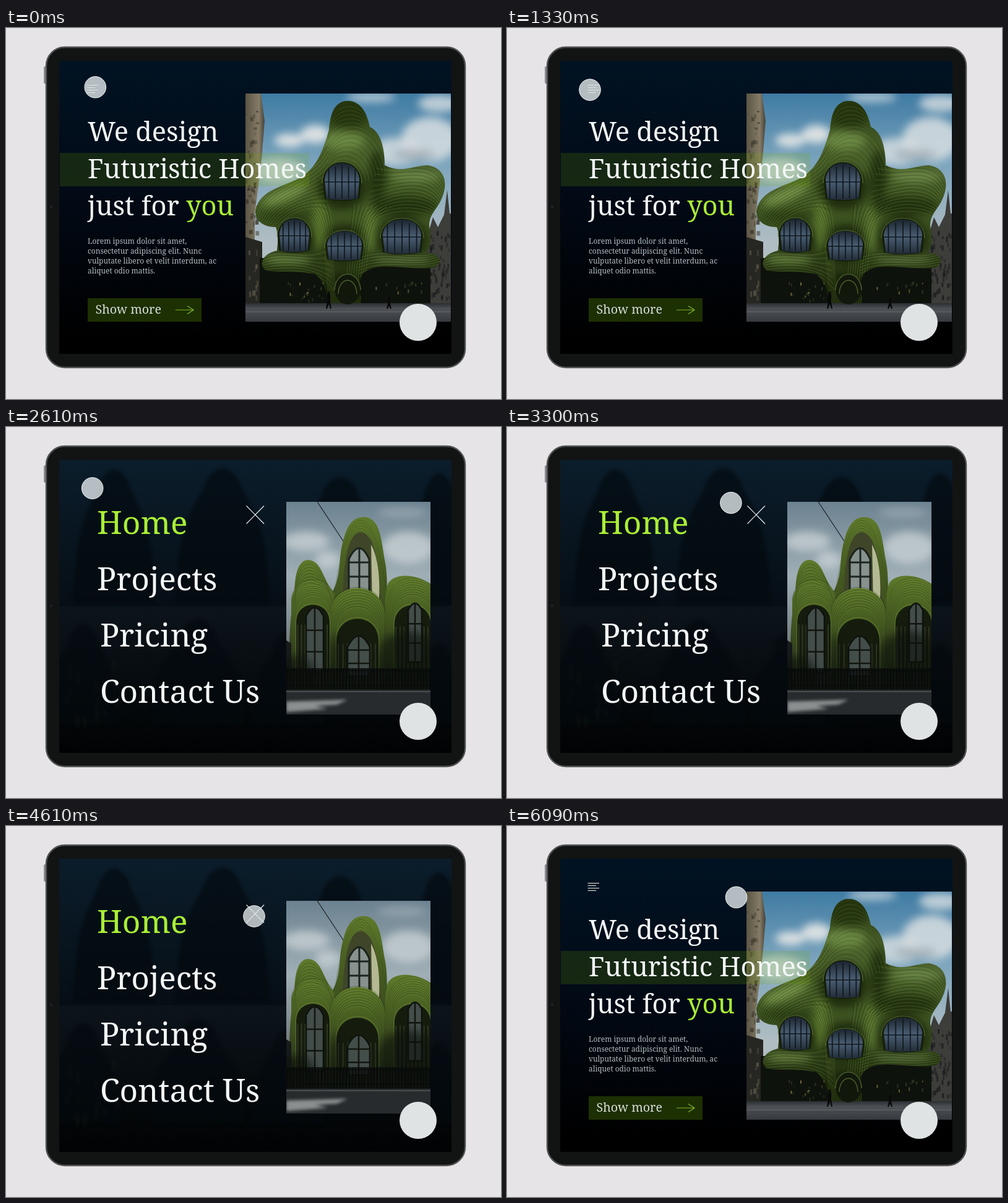
Write an HTML page that moves like this. It is 800x600 px and loops after 6120 ms.

```html
<!DOCTYPE html>
<html lang="en">
<head>
<meta charset="utf-8">
<title>Futuristic homes</title>
<style>
  html, body { margin: 0; width: 100%; height: 100%; overflow: hidden; background: #e6e4e7; }
  svg { display: block; width: 800px; height: 600px; }
  text { font-family: "Noto Serif", "Liberation Serif", serif; fill: #f3f7f7; white-space: pre; }
  .title { font-size: 43.3px; }
  .nav { font-size: 51.4px; }
  .copy { font-size: 11.9px; fill: #b4bcc2; }
  .lime, tspan.lime { fill: #a9ee35; }
  .soft { filter: url(#soft); }
  .haze { filter: url(#haze); }
  .line { fill: none; stroke: #e8edef; stroke-width: 1.2; }
</style>
</head>
<body>
<svg viewBox="0 0 800 600">
  <defs>
    <filter id="soft" x="-50%" y="-50%" width="200%" height="200%" color-interpolation-filters="sRGB"><feGaussianBlur stdDeviation="7"/></filter>
    <filter id="haze" x="-20%" y="-20%" width="140%" height="140%" color-interpolation-filters="sRGB"><feGaussianBlur stdDeviation="2.5"/></filter>
    <linearGradient id="night" x2="0" y2="1">
      <stop stop-color="#011323"/><stop offset=".45" stop-color="#020a16"/><stop offset=".95" stop-color="#000"/>
    </linearGradient>
    <linearGradient id="sky" x2="0" y2="1">
      <stop stop-color="#3f7ba3"/><stop offset=".3" stop-color="#7ba4bd"/><stop offset=".65" stop-color="#b0bdc2"/>
    </linearGradient>
    <linearGradient id="dull" x2="0" y2="1">
      <stop stop-color="#6c8290"/><stop offset=".35" stop-color="#a0afb6"/><stop offset=".8" stop-color="#5c6668"/>
    </linearGradient>
    <linearGradient id="moss" x2="0" y2="1">
      <stop stop-color="#2a3b13"/><stop offset=".25" stop-color="#4a602a"/><stop offset=".6" stop-color="#3d5220"/><stop offset="1" stop-color="#1a260c"/>
    </linearGradient>
    <linearGradient id="shell" x2="0" y2="1">
      <stop stop-color="#5f7a2b"/><stop offset=".3" stop-color="#465c20"/><stop offset=".65" stop-color="#33411d"/><stop offset="1" stop-color="#1b2412"/>
    </linearGradient>
    <linearGradient id="stone" x2="1" y2="0">
      <stop stop-color="#5b5545"/><stop offset=".7" stop-color="#857b66"/><stop offset="1" stop-color="#45423a"/>
    </linearGradient>
    <linearGradient id="glass" x2="0" y2="1">
      <stop stop-color="#1a242e"/><stop offset=".5" stop-color="#4a5e73"/><stop offset="1" stop-color="#222d38"/>
    </linearGradient>
    <linearGradient id="road" x2="0" y2="1">
      <stop stop-color="#2b2e31"/><stop offset=".3" stop-color="#4d5055"/><stop offset="1" stop-color="#36393e"/>
    </linearGradient>
    <linearGradient id="upper" x2="0" y2="1"><stop stop-color="#0b1d2b"/><stop offset="1" stop-color="#060e15"/></linearGradient>
    <linearGradient id="lower" x2="0" y2="1"><stop stop-color="#0c141b"/><stop offset=".75" stop-color="#040709"/><stop offset="1" stop-color="#010203"/></linearGradient>
    <clipPath id="screen"><rect x="86" y="53" width="634" height="474"/></clipPath>
    <clipPath id="wide"><rect x="387" y="106" width="332" height="369"/></clipPath>
    <clipPath id="tall"><rect x="453" y="121" width="233" height="344"/></clipPath>
    <path id="body" d="M522 165C524 140 530 120 550 118C574 116 584 140 588 160C606 168 612 195 612 222C640 236 660 222 682 222C706 226 714 246 707 268C700 292 684 298 684 320C688 340 686 352 680 364C706 364 706 384 690 388C650 392 600 376 578 396C566 410 574 425 574 445H520C520 425 512 408 500 398C470 392 440 396 420 392C408 384 412 366 438 360C440 344 440 332 436 322C412 322 396 306 406 286C416 264 440 258 468 246C500 232 512 200 522 165Z"/>
    <clipPath id="inBody"><use href="#body"/></clipPath>
  </defs>

  <rect width="800" height="600" fill="#e6e4e7"/>
  <rect x="61" y="62" width="5" height="28" rx="2" fill="#8d8c90"/>
  <rect x="65" y="31" width="677" height="518" rx="30" fill="#121313" stroke="#505153" stroke-width="2.4"/>
  <circle cx="73" cy="289" r="2.2" fill="#1d232b"/>

  <g clip-path="url(#screen)">
    <rect x="86" y="53" width="634" height="474" fill="#010305"/>
    <g id="home">
      <rect x="86" y="53" width="634" height="474" fill="url(#night)"/>
      <g clip-path="url(#wide)">
        <rect x="387" y="106" width="332" height="369" fill="url(#sky)"/>
        <g class="soft" fill="#d9dfe1">
          <ellipse cx="458" cy="182" rx="24" ry="11"/><ellipse cx="500" cy="172" rx="24" ry="15"/>
          <ellipse cx="440" cy="230" rx="40" ry="20" opacity=".7"/><ellipse cx="630" cy="200" rx="40" ry="22" opacity=".8"/>
          <ellipse cx="685" cy="180" rx="46" ry="36" opacity=".85"/><ellipse cx="700" cy="122" rx="34" ry="14" opacity=".8"/>
          <ellipse cx="590" cy="112" rx="40" ry="8" opacity=".7"/>
          <ellipse cx="660" cy="205" rx="34" ry="9" fill="#929fa6" opacity=".6"/>
        </g>
        <path d="M387 106H412L418 150L414 200L408 255L402 300V445H387Z" fill="url(#stone)"/>
        <path d="M387 338L414 346V445H387Z" fill="#262622"/>
        <path d="M680 445V340L690 306L698 322L708 302L713 262L717 300H719V445Z" fill="#3d3d3a"/>
        <g id="bricks"></g>
        <rect x="410" y="372" width="276" height="75" fill="#0e120c"/>
        <rect x="387" y="445" width="332" height="30" fill="url(#road)"/>
        <path d="M387 459H719" stroke="#6a6d73" stroke-width="1"/>
        <use href="#body" fill="url(#moss)"/>
        <g clip-path="url(#inBody)">
          <g class="soft">
            <ellipse cx="552" cy="138" rx="34" ry="24" fill="#26360f"/>
            <ellipse cx="545" cy="182" rx="36" ry="15" fill="#6a8742"/>
            <ellipse cx="450" cy="270" rx="40" ry="10" fill="#76944a" transform="rotate(-22 450 270)"/>
            <ellipse cx="662" cy="240" rx="42" ry="9" fill="#6c874a"/>
            <ellipse cx="600" cy="240" rx="14" ry="44" fill="#223210"/>
            <ellipse cx="640" cy="288" rx="58" ry="16" fill="#233310"/>
            <ellipse cx="452" cy="306" rx="42" ry="12" fill="#2c3f15"/>
            <ellipse cx="543" cy="258" rx="40" ry="36" fill="#1f2d0d"/>
            <ellipse cx="468" cy="342" rx="32" ry="28" fill="#1d2a0d"/>
            <ellipse cx="548" cy="350" rx="36" ry="32" fill="#1d2a0d"/>
            <ellipse cx="640" cy="340" rx="40" ry="34" fill="#1d2a0d"/>
            <ellipse cx="507" cy="318" rx="9" ry="40" fill="#5f7c30"/>
            <ellipse cx="588" cy="325" rx="8" ry="40" fill="#607c34"/>
            <ellipse cx="455" cy="374" rx="38" ry="6" fill="#758f4c"/>
            <ellipse cx="640" cy="374" rx="46" ry="5" fill="#69824a"/>
            <ellipse cx="548" cy="428" rx="40" ry="30" fill="#172209"/>
          </g>
          <g id="grain"></g>
        </g>
        <g id="panes"></g>
        <ellipse cx="552" cy="422" rx="21" ry="25" fill="#11180b"/>
        <path d="M531 424A21 26 0 0 1 573 424M537 430A15 22 0 0 1 567 430" fill="none" stroke="#4c5f2d" stroke-width="1.5"/>
        <g id="lamps"></g>
        <g fill="#08090a">
          <path d="M519 430h5v13l2 11h-2l-2-8l-3 8h-2l2-11Z"/><circle cx="521.5" cy="428" r="2"/>
          <path d="M617 439h4v7l2 8h-2l-2-5l-2 5h-2l2-8Z"/><circle cx="619" cy="437" r="2"/>
        </g>
      </g>
      <rect x="87" y="202" width="403" height="54" fill="#75ae00" opacity=".18"/>
      <path class="line" d="M130.500 92.500H149M130.500 96.500H144M130.500 100.500H149M130.500 104.500H144"/>
      <text class="title" x="132" y="183">We design</text>
      <text class="title" x="132" y="243">Futuristic Homes</text>
      <text class="title" x="132" y="303">just for <tspan class="lime">you</tspan></text>
      <text class="copy" x="132" y="348.500">Lorem ipsum dolor sit amet,</text>
      <text class="copy" x="132" y="364.800">consectetur adipiscing elit. Nunc</text>
      <text class="copy" x="132" y="381.100">vulputate libero et velit interdum, ac</text>
      <text class="copy" x="132" y="397.400">aliquet odio mattis.</text>
      <rect x="132" y="437" width="184" height="38" fill="#1d3003"/>
      <text x="144.500" y="462" font-size="19.7" style="fill:#d9ded7">Show more</text>
      <path d="M274 456H303M293 449.500L303 456L293 462.500" fill="none" stroke="#82b52b" stroke-width="1.2"/>
    </g>

    <g id="menu" opacity="0">
      <rect x="86" y="53" width="634" height="237" fill="url(#upper)"/>
      <rect x="86" y="290" width="634" height="237" fill="url(#lower)"/>
      <g id="mounds" class="haze"></g>
      <g clip-path="url(#tall)">
        <rect x="453" y="121" width="233" height="344" fill="url(#dull)"/>
        <g class="soft" fill="#cbd3d6" opacity=".75">
          <ellipse cx="485" cy="185" rx="38" ry="16"/><ellipse cx="650" cy="195" rx="42" ry="26"/>
          <ellipse cx="520" cy="215" rx="20" ry="14"/><ellipse cx="640" cy="138" rx="40" ry="7" opacity=".5"/>
        </g>
        <path d="M503 121L552 195" stroke="#20262a" stroke-width="1.300"/>
        <g id="towers"></g>
        <path d="M453 345L461 350V430H453Z" fill="#171b1b"/>
        <g class="soft" fill="#0b100a" opacity=".6">
          <ellipse cx="650" cy="375" rx="50" ry="45"/><ellipse cx="470" cy="400" rx="30" ry="30"/>
          <ellipse cx="616" cy="390" rx="16" ry="50"/><ellipse cx="532" cy="385" rx="9" ry="50"/>
        </g>
        <rect x="453" y="390" width="233" height="37" fill="#0c100d" opacity=".8"/>
        <path id="fence" stroke="#060807" stroke-width="1.200"/>
        <rect x="453" y="425" width="233" height="40" fill="#272b2e"/>
        <path d="M453 428H686" stroke="#484d50" stroke-width="2"/>
        <path class="haze" d="M453 444L552 441L535 449L500 451L520 456L453 461Z" fill="#8b8f8f"/>
      </g>
      <path class="line" d="M388.500 127.500L417 156.500M417 127.500L388.500 156.500"/>
      <text class="nav lime" x="147" y="173">Home</text>
      <text class="nav" x="147" y="264">Projects</text>
      <text class="nav" x="152" y="355">Pricing</text>
      <text class="nav" x="152" y="446">Contact Us</text>
    </g>
    <circle cx="666" cy="476" r="30" fill="#dfe3e4"/>
  </g>
  <circle id="dot" r="17.300" fill="#dce3e6" fill-opacity=".82" stroke="#f0f4f5" stroke-width="1"/>
</svg>

<script>
const $ = id => document.getElementById(id);
const lerp = (a, b, u) => a + (b - a) * u;
const clamp = u => Math.max(0, Math.min(1, u));
const times = (n, f) => Array.from({ length: n }, (_, i) => f(i)).join('');
let seed = 7;
const rand = (a, b) => {
  seed = (seed * 16807) % 2147483647;
  return lerp(a, b, seed / 2147483647);
};

// Ribs blended between two cubic curves
function fan(a, b, n, opacity = .35) {
  return times(n, i => {
    const p = a.map((v, k) => lerp(v, b[k], i / (n - 1)).toFixed(1));
    const color = i % 2 ? '#7b9945' : '#16220a';
    return `<path d="M${p[0]} ${p[1]}C${p.slice(2)}" fill="none" stroke="${color}" stroke-width=".8" opacity="${opacity}"/>`;
  });
}

$('grain').innerHTML =
  fan([520, 165, 526, 110, 582, 110, 590, 165], [520, 185, 530, 155, 580, 150, 592, 180], 12, .25) +
  fan([500, 236, 528, 140, 595, 140, 616, 230], [512, 250, 520, 208, 570, 208, 576, 250], 16, .25) +
  fan([520, 190, 500, 245, 420, 250, 404, 300], [520, 300, 500, 280, 450, 300, 436, 324], 24) +
  fan([600, 222, 650, 238, 690, 205, 710, 262], [572, 340, 590, 290, 660, 290, 690, 305], 26) +
  fan([470, 285, 520, 300, 512, 390, 522, 445], [520, 285, 535, 320, 520, 390, 540, 445], 16) +
  fan([560, 285, 560, 320, 545, 390, 548, 445], [622, 290, 575, 310, 590, 380, 574, 445], 18) +
  fan([412, 372, 440, 350, 480, 378, 520, 355], [418, 394, 450, 396, 500, 380, 530, 425], 14) +
  fan([570, 370, 620, 350, 660, 378, 700, 360], [570, 400, 610, 380, 650, 396, 700, 384], 13);

function pane(x, y, rx, ry) {
  const shape = (k, fill) =>
    `<path d="M${x - rx - k} ${y}C${x - rx - k} ${y - ry * 1.3 - k} ${x + rx + k} ${y - ry * 1.3 - k} ${x + rx + k} ${y}L${x + rx * .9 + k} ${y + ry}Q${x} ${y + ry + 4 + k} ${x - rx * .9 - k} ${y + ry}Z" fill="${fill}"/>`;
  const bars = times(5, i => {
    const dx = (i - 2) * rx * .38;
    return `M${x + dx} ${y - ry * .88 + Math.abs(dx) * .25}V${y + ry}`;
  });
  return shape(3, '#141d0a') + shape(0, 'url(#glass)') +
    `<path d="${bars}M${x - rx} ${y + 2}H${x + rx}" stroke="#10171d" stroke-width="1.7"/>` +
    `<path d="M${x - rx - 4} ${y + 4}C${x - rx - 4} ${y - ry * 1.45} ${x + rx + 4} ${y - ry * 1.45} ${x + rx + 4} ${y + 4}" fill="none" stroke="#66803e" stroke-width="1.3" opacity=".6"/>`;
}
$('panes').innerHTML = pane(543, 247, 28, 29) + pane(466, 334, 24, 26) +
  pane(547, 351, 28, 23) + pane(640, 336, 31, 27);

const speck = (x, y, w, h, fill) =>
  `<rect x="${x}" y="${y}" width="${w}" height="${h}" fill="${fill}" opacity="${rand(.3, .8)}"/>`;
$('bricks').innerHTML =
  times(46, () => speck(rand(387, 406), rand(108, 330), rand(2, 6), rand(2, 9), '#3b372c')) +
  times(50, () => speck(rand(683, 716), rand(326, 436), 3, rand(4, 9), '#17191a')) +
  times(14, () => speck(rand(388, 408), rand(358, 435), 3, rand(4, 10), '#5d5849'));
$('lamps').innerHTML = times(38, i =>
  speck(i < 22 ? rand(445, 512) : rand(590, 675), rand(410, 440), rand(1, 3), rand(2, 6), i % 3 ? '#35412b' : '#8d854f'));

// Faint skyline behind the menu
const mound = (x, top, w, base) =>
  `<path d="M${x - w} ${base}C${x - w} ${top + 70} ${x - w * .5} ${top + 60} ${x - w * .35} ${top + 20}Q${x} ${top - 18} ${x + w * .35} ${top + 20}C${x + w * .5} ${top + 60} ${x + w} ${top + 70} ${x + w} ${base}Z" fill="#040a0f" opacity=".65"/>`;
$('mounds').innerHTML =
  [[175, 68, 65], [350, 66, 75], [540, 80, 75], [700, 74, 55]].map(m => mound(...m, 286)).join('') +
  [[125, 318, 60], [310, 310, 75], [455, 330, 60], [700, 350, 50]].map(m => mound(...m, 480)).join('') +
  times(16, () => speck(rand(90, 190), rand(375, 470), 3, rand(8, 20), '#141a17'));

// Hooded tower: outer moss shell, dark recess, lit window
function tower(x, top, w, base, win) {
  const arch = (r, y) => `M${x - r} ${base}V${y + r * 1.1}C${x - r} ${y - r * .3} ${x + r} ${y - r * .3} ${x + r} ${y + r * 1.1}V${base}Z`;
  const ribs = (sx, sy, n) => fan([x - w, sy + w, x - w, sy - w * .3, x + w, sy - w * .3, x + w, sy + w],
    [x - sx, sy + w * 1.6, x - sx, sy + w * .5, x + sx, sy + w * .5, x + sx, sy + w * 1.6], n);
  const [wx, wy, ww, wh] = win;
  const glass = `M${wx - ww} ${wy + wh}V${wy + ww}Q${wx} ${wy - ww} ${wx + ww} ${wy + ww}V${wy + wh}Z`;
  return `<path d="${arch(w, top)}" fill="url(#shell)"/>` + ribs(w * .75, top, 16) +
    `<path d="${arch(w * .77, top + w * 1.15)}" fill="#151c0e"/>` +
    `<path d="${arch(w * .79, top + w * 1.1)}" fill="none" stroke="#6d8637" stroke-width="1.200" opacity=".6"/>` +
    times(9, i => `<path d="M${x - w * .7 + i * w * .17} ${top + w * 2.1}V${base}" stroke="#4b5637" stroke-width="1.800" opacity=".55"/>`) +
    `<path d="${glass}" fill="#434d4a" stroke="#0e120d" stroke-width="2.500"/>` +
    `<path d="M${wx} ${wy}V${wy + wh}M${wx - ww} ${wy + wh * .35}H${wx + ww}M${wx - ww} ${wy + wh * .68}H${wx + ww}" stroke="#12160f" stroke-width="2.500"/>`;
}
const bulge = (d, fill) => `<path d="${d}" fill="${fill}"/>`;
$('towers').innerHTML =
  bulge('M526 425V270C545 235 535 215 546 180C554 150 568 144 582 146C604 150 606 178 612 215C620 250 612 290 622 425Z', 'url(#shell)') +
  fan([528, 290, 550, 100, 600, 110, 616, 290], [546, 290, 552, 140, 592, 155, 602, 290], 16) +
  bulge('M543 290C545 230 550 172 573 170C596 172 603 220 606 290Z', '#3f4529') +
  bulge('M590 190C604 215 605 260 602 290H592Z', '#b4b994') +
  `<path d="M554 265V214Q571 178 587 214V265Z" fill="#87928f" stroke="#1b221b" stroke-width="3"/>
   <path d="M571 196V265M554 219H587M554 242H587" stroke="#1d251f" stroke-width="3"/>` +
  bulge('M459 425C456 380 458 300 466 275C466 230 475 214 490 215C512 218 512 250 531 268L534 425Z', 'url(#shell)') +
  tower(496, 246, 35, 425, [499, 292, 14, 105]) +
  fan([467, 290, 464, 200, 508, 200, 528, 285], [466, 270, 480, 250, 505, 248, 528, 275], 14) +
  bulge('M612 425C618 350 606 280 618 252C630 236 660 236 690 256V425Z', 'url(#shell)') +
  tower(657, 243, 38, 425, [661, 285, 11, 95]) +
  tower(568, 258, 44, 425, [570, 338, 18, 65]);

$('fence').setAttribute('d', times(47, i => `M${455 + i * 5} 390V426`) + 'M453 394H686M453 418H686');

// Timeline: the loop cuts into the return trip, so that trip spans the seam
const LOOP = 6120, TRIP = 1080, FADE = 400;
const OPEN = 1532, CLOSE = 4732;
const there = [134, 100, 296, 71, 401, 146];
const back = [401, 146, 303, 28, 134, 100];
const trips = [
  { from: -958, path: back },
  { from: 2520, path: there },
  { from: 5820, path: back }
];
const ramp = (t, from, span) => .5 - .5 * Math.cos(Math.PI * clamp((t - from) / span));
const press = (t, at) => ramp(t, at - 150, 200) - ramp(t, at + 380, 250);

function place(t) {
  const { from, path: [x0, y0, x1, y1, x2, y2] } = trips.filter(s => t >= s.from).pop();
  const u = ramp(t, from, TRIP);
  const bend = (a, b, c) => lerp(lerp(a, b, u), lerp(b, c, u), u);
  return [bend(x0, x1, x2), bend(y0, y1, y2)];
}

function draw(now) {
  const t = now % LOOP;
  const [x, y] = place(t);
  const shown = ramp(t, OPEN, FADE) - ramp(t, CLOSE, FADE);
  $('home').setAttribute('opacity', (1 - shown).toFixed(3));
  $('menu').setAttribute('opacity', shown.toFixed(3));
  $('dot').setAttribute('transform', `translate(${x.toFixed(2)} ${y.toFixed(2)})`);
  $('dot').setAttribute('opacity', (1 - .42 * (press(t, OPEN) + press(t, CLOSE))).toFixed(3));
  requestAnimationFrame(draw);
}
draw(performance.now());
</script>
</body>
</html>
```
